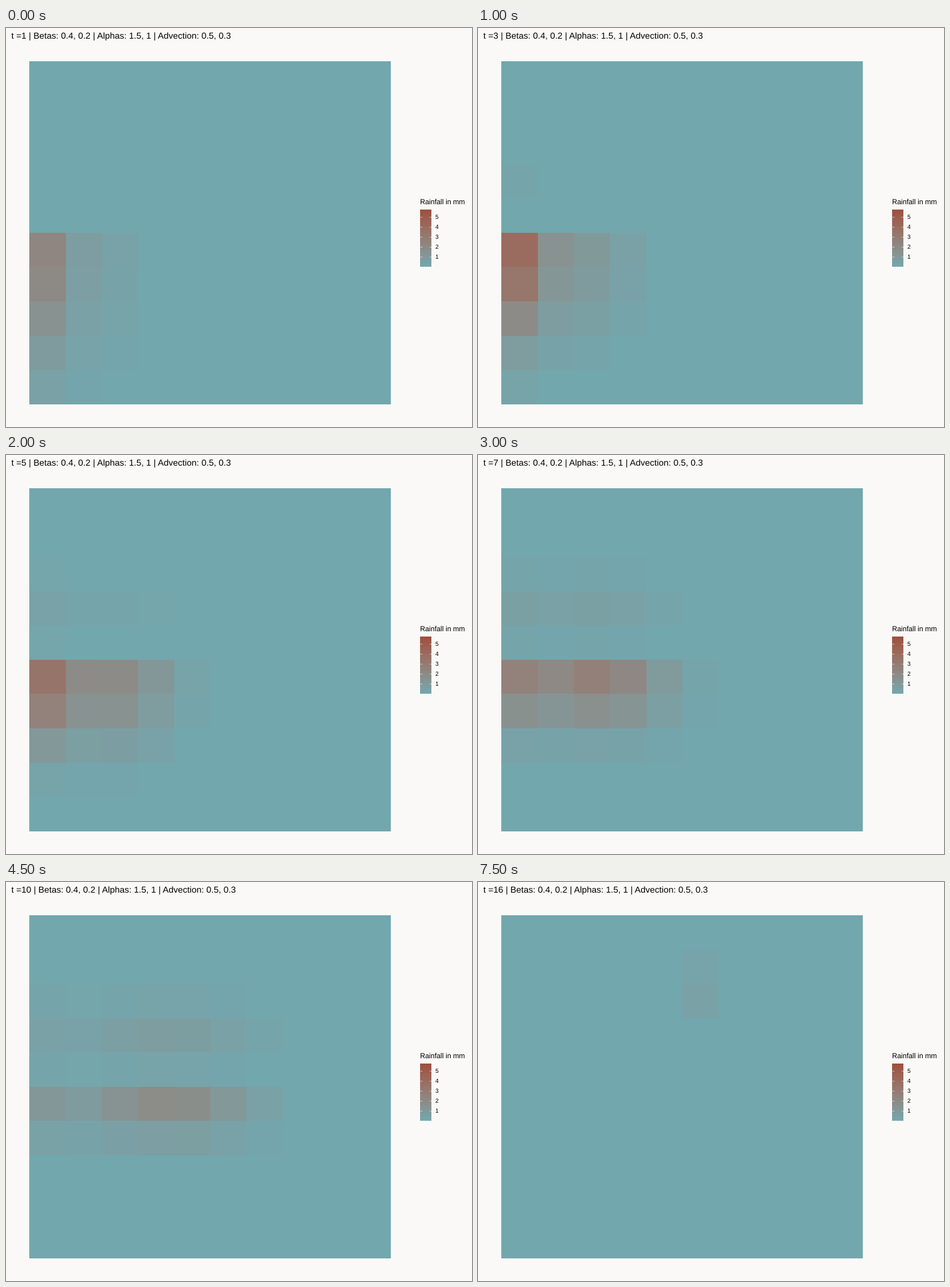
These frames come from a looping animation (700x600 px, 8000 ms). A matplotlib script:

```python
import numpy as np
import matplotlib.pyplot as plt
from matplotlib.animation import FuncAnimation
from matplotlib.colors import ListedColormap, to_rgb

W, H, DPI = 700, 600, 100
FRAMES, STEP_MS = 16, 500
PAPER, LOW, HIGH = "#faf9f7", "#72a7ae", "#9e503f"
VMAX = 5.67
N = 10

plt.rcParams["font.family"] = "Liberation Sans"
plt.rcParams["text.hinting"] = "no_hinting"

RGB_TO_XYZ = np.array([[0.4124, 0.3576, 0.1805],
                       [0.2126, 0.7152, 0.0722],
                       [0.0193, 0.1192, 0.9505]])
WHITE = RGB_TO_XYZ.sum(axis=1)


def to_lab(color):
    """Cube-root responses, a linear transform of CIE Lab."""
    c = np.array(to_rgb(color))
    lin = np.where(c > 0.04045, ((c + 0.055) / 1.055) ** 2.4, c / 12.92)
    return np.cbrt(RGB_TO_XYZ @ lin / WHITE)


def from_lab(f):
    lin = np.linalg.inv(RGB_TO_XYZ) @ (f ** 3 * WHITE)
    return np.clip(1.055 * np.clip(lin, 0, 1) ** (1 / 2.4) - 0.055, 0, 1)


def lab_ramp(low, high, n=256):
    a, b = to_lab(low), to_lab(high)
    return ListedColormap([from_lab(a + (b - a) * k) for k in np.linspace(0, 1, n)])


cells = np.arange(N)


def bell(x, center, width):
    return np.exp(-((x - center) / width) ** 2)


def swell_center(t):
    k = np.clip((t - 5) / 11, 0, 1)
    return 2 + 3 * k * k * (3 - 2 * k)


def storm(t):
    """Rain entering on the left edge, with a swell that drifts right."""
    inflow = 3.9 * (t / 3 * np.exp(1 - t / 3)) ** 1.3
    swell = 2.6 * bell(t, 7.7, 4)
    cols = (inflow * np.exp(-cells / 0.8)
            + swell * bell(cells, swell_center(t), 0.65 + 0.15 * t))
    lower = bell(cells, 5, 3.5 * np.exp(-0.13 * t))
    upper = 0.38 * (t / 10) ** 2 * np.exp(-1.1 * abs(cells - 3))
    return np.outer(np.where(cells < 5, upper, lower), cols)


def remnant(t):
    """Two faint bands that rise once the storm has passed."""
    k = np.clip((t - 12) / 4, 0, 1)
    rows = ((1 - 0.5 * k) * bell(cells, 3 - 2 * k, 0.5)
            + bell(cells, 5 - 3 * k, 0.5))
    return np.outer(rows, 0.4 * bell(cells, swell_center(t), 13.5 / t))


def rainfall(t):
    fade = np.clip((12 - t) / 2, 0, 1)
    grid = fade * storm(t) + (1 - fade) * remnant(t)
    return np.where(grid < 0.1, 0, grid)


fig = plt.figure(figsize=(W / DPI, H / DPI), dpi=DPI, facecolor=PAPER)
ax = fig.add_axes([0, 0, 1, 1])


def label(x, y, text, px):
    return ax.text(x, y, text, fontsize=px * 72 / DPI, color="black",
                   ha="left", va="baseline")


cmap = lab_ramp(LOW, HIGH)
x_edges = np.ceil(35 + 54.3 * np.arange(N + 1) - 1e-6)
y_edges = np.floor(50 + 51.6 * np.arange(N + 1) + 0.3)
mesh = ax.pcolormesh(x_edges, y_edges, rainfall(1), cmap=cmap, vmin=0, vmax=VMAX,
                     antialiased=False, linewidth=0)

# colour key
ax.imshow(np.linspace(1, 0, 86)[:, None], cmap=cmap, vmin=0, vmax=1, aspect="auto",
          extent=(622, 639, 359, 273), interpolation="nearest")
label(621.5, 266, "Rainfall in mm", 10.6)
for mm in range(1, 6):
    y = 359.4 - mm * 15.15
    for x in (622, 635.6):
        ax.plot([x, x + 3.4], [y, y], color="white", lw=0.4, solid_capstyle="butt")
    label(644.5, y + 3.2, str(mm), 8.8)

title = label(8, 15.8, "", 13.25)
ax.set_xlim(0, W)
ax.set_ylim(H, 0)
ax.axis("off")


def update(i):
    t = i + 1
    mesh.set_array(rainfall(t))
    title.set_text(f"t ={t} | Betas: 0.4, 0.2 | Alphas: 1.5, 1 | Advection: 0.5, 0.3")
    return mesh, title


anim = FuncAnimation(fig, update, frames=FRAMES, interval=STEP_MS,
                     repeat=True, repeat_delay=0)
plt.show()
```
